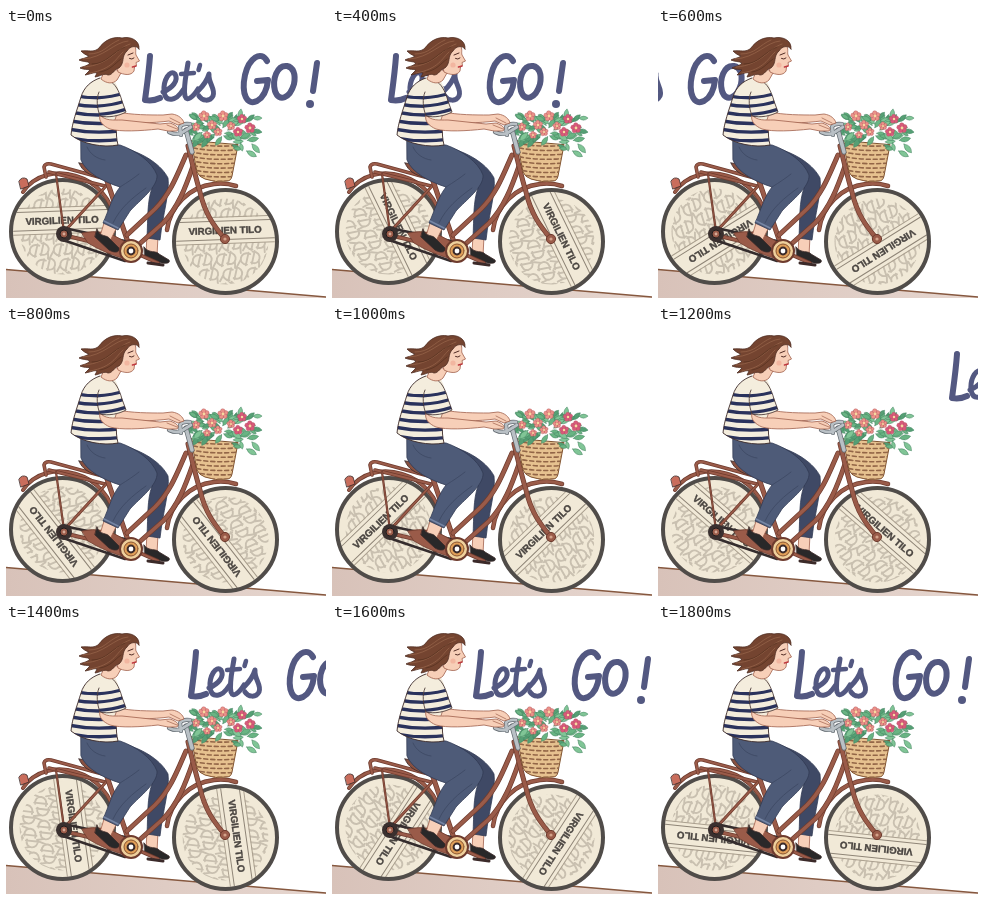
Write an HTML page with a canvas that moves like this. It is 320 px wide and 270 px high and loops after 2000 ms.

```html
<!DOCTYPE html>
<html lang="en">
<head>
<meta charset="utf-8">
<title>Let's Go!</title>
<style>
  html, body { margin: 0; width: 100%; height: 100%; overflow: hidden; background: #fff; }
  canvas { display: block; width: 320px; height: 270px; }
</style>
</head>
<body>
<canvas id="stage" width="320" height="270" role="img" aria-label="Let's Go! A woman rides a bicycle"></canvas>
<script>
const ctx = document.getElementById('stage').getContext('2d');
const LOOP = 2000;
const INK = '#3b2a29', FRAME = '#9a5b49', FRAME_LINE = '#6e3b2e', SKIN = '#f7cfb8', SKIN_LINE = '#a0604c';
const NAVY = '#2a325c', CREAM = '#f1e9d7', DENIM = '#4e5b78', DENIM_FAR = '#3f4965', DENIM_LINE = '#313a54';
const LETTER = '#535881';

// start time, wheel angle in degrees, lettering offset
const poses = [
  [0, -2, 0], [400, 64, -80], [600, 148, -205], [800, 232, -340], [1000, 316, 300],
  [1200, 41, 155], [1400, 82, 46], [1600, 123, 5], [1800, 186, 0]
];

function random(seed) {
  return () => (seed = (seed * 16807) % 2147483647) / 2147483647;
}

function shape(d, fill, stroke = INK, width = 0.8) {
  const path = new Path2D(d);
  if (fill) { ctx.fillStyle = fill; ctx.fill(path); }
  if (stroke) { ctx.strokeStyle = stroke; ctx.lineWidth = width; ctx.stroke(path); }
  return path;
}

function line(d, color, width) { shape(d, null, color, width); }

function tube(d, width = 5, color = FRAME, edge = FRAME_LINE) {
  line(d, edge, width);
  line(d, color, width - 1.4);
}

function disc(x, y, r, fill, stroke, width = 1) {
  ctx.beginPath();
  ctx.arc(x, y, r, 0, Math.PI * 2);
  if (fill) { ctx.fillStyle = fill; ctx.fill(); }
  if (stroke) { ctx.strokeStyle = stroke; ctx.lineWidth = width; ctx.stroke(); }
}

function clipped(path, draw) {
  ctx.save();
  ctx.clip(path);
  draw();
  ctx.restore();
}

function lettering(dx) {
  ctx.save();
  ctx.translate(dx, 0);
  const pen = (d, w = 5) => line(d, LETTER, w);
  pen('M144 28 C143 43 141 57 139 72 C145 73 150 72 154 70', 6);
  pen('M157 64 C166 60 173 53 169 46 C164 41 157 52 158 64 C160 75 170 73 177 62');
  pen('M182 35 C180 48 177 60 179 68 C181 74 187 69 192 61');
  pen('M175 46 L188 45', 4.5);
  pen('M194 37 L192.5 42', 4.5);
  pen('M192 63 C197 58 201 53 203 46 C202 55 210 61 207 68 C204 74 196 73 193 68');
  pen('M261 33 C255 22 243 30 239 47 C235 66 241 78 251 73 C258 69 261 62 262 52 L251 53', 6);
  pen('M281 38 C271 37 266 51 269 63 C273 75 284 70 288 56 C290 46 287 39 281 38 Z', 6);
  pen('M311 35 L307 63', 6);
  disc(304, 76, 4, LETTER);
  ctx.restore();
}

function ground() {
  const fade = ctx.createLinearGradient(0, 0, 320, 0);
  fade.addColorStop(0, '#d8c2b9');
  fade.addColorStop(1, '#e6d6cf');
  shape('M0 241.5 L320 269 V270 H0 Z', fade, null);
  line('M0 241.5 L320 269', '#86583f', 1.3);
}

// one loop-and-stem ornament of the printed wheel cover
function ornament(x, y, flip) {
  ctx.save();
  ctx.translate(x, y);
  ctx.rotate(0.25);
  ctx.scale(flip, 1);
  line('M-3 -7 V6 M-5 -6 C6 -8 6 7 -4 5 M3 1 L5 8', '#c9c0b0', 1.9);
  ctx.restore();
}

function wheel(x, y, degrees) {
  ctx.save();
  ctx.translate(x, y);
  ctx.rotate(degrees * Math.PI / 180);
  disc(0, 0, 52, CREAM);
  const cover = new Path2D();
  cover.arc(0, 0, 43, 0, Math.PI * 2);
  clipped(cover, () => {
    for (let row = -3; row <= 3; row++) {
      for (let col = -4; col <= 4; col++) {
        ornament(col * 12 + (row & 1) * 6, row * 15 + 3, (row + col) & 1 ? 1 : -1);
      }
    }
  });
  ctx.fillStyle = CREAM;
  ctx.fillRect(-46, -24, 92, 26);
  line('M-43 -24.5 H43 M-49 2 H49', '#aba08f', 1);
  line('M-45 -20.5 H45 M-49 -2 H49', '#8f8577', 1);
  ctx.fillStyle = ctx.strokeStyle = '#4a4541';
  ctx.lineWidth = 0.4;
  ctx.font = 'bold 9.7px "Liberation Sans", Arial, sans-serif';
  ctx.textAlign = 'center';
  ctx.textBaseline = 'middle';
  ctx.fillText('VIRGILIEN TILO', 0, -10.5);
  ctx.strokeText('VIRGILIEN TILO', 0, -10.5);
  ctx.restore();
  disc(x, y, 51.5, null, '#504c49', 4);
}

function farLeg() {
  shape('M141 207 L140 225 L151 228 L152 208 Z', SKIN, SKIN_LINE);
  shape('M138 219 C143 226 150 222 153 226 L163 232 C165 236 158 236 152 234 L139 230 Z', '#292829');
  shape('M118 120 C140 126 156 138 162 150 C164 164 157 185 154 212 L141 210 C142 190 141 174 146 160 L126 145 Z',
    DENIM_FAR, DENIM_LINE);
}

function bike() {
  // fenders, rack and lamp
  tube('M17 164 C29 146 51 142 70 148 C91 154 106 172 109 192', 4);
  tube('M161 202 C164 178 183 159 208 156 C216 155 224 156 230 158', 4.5);
  tube('M40 149 L38 139 Q39 135 45 136 L100 151 M43 144 L99 158', 3.6);
  tube('M50 146 L58 204', 2.2);
  shape('M13 153 Q16 148 21 151 L23 158 L15 161 Z', '#c96d5c');

  // stays and main tubes
  tube('M101 157 L57 205', 3);
  tube('M57 207 L125 223', 4);
  tube('M99 147 L125 223', 5.2);
  tube('M180 127 C172 145 165 165 149 181 L121 207', 5);
  tube('M187 138 C180 158 172 180 157 195 L130 219', 5);
  tube('M182 118 C186 134 190 151 194 164 C199 186 208 198 219 211', 5);
  disc(219, 211, 4.6, FRAME, FRAME_LINE);
  disc(219, 211, 1.6, '#d3a28a');

  // saddle
  shape('M73 135 C82 135 93 141 108 145 Q111 149 105 151 L94 150 C83 147 76 143 73 135 Z', '#875040');
}

function drivetrain() {
  line('M58 200 L119 213 M57 212 L119 233', '#342c2d', 2.4);
  shape('M76 205 Q98 200 118 213 L119 231 Q98 225 82 215 Z', FRAME, FRAME_LINE);
  disc(58, 206, 8, '#3a302f');
  disc(58, 206, 4, FRAME, '#201c1d');
  disc(58, 206, 1.4, '#d6aa97');
}

function crank() {
  tube('M125 223 L152 235', 3.6);
  line('M142 235 L157 237', INK, 3);
  disc(125, 223, 11, '#efd09c', FRAME_LINE, 2);
  disc(125, 223, 7, '#df9e58', '#8a5430', 1);
  disc(125, 223, 3.4, '#fff', INK, 2);
}

function nearLeg() {
  shape('M99 192 L94 208 L104 213 L111 199 Z', SKIN, SKIN_LINE);
  shape('M91 201 C94 210 101 206 104 211 L113 220 C114 225 108 225 103 222 L89 209 Z', '#292829');
  shape('M75 111 C88 118 104 117 114 117 C131 123 146 134 151 147 C152 159 134 172 124 183 L112 202 ' +
    'L97 195 C103 182 106 169 114 159 C98 154 80 145 75 132 Z', DENIM, DENIM_LINE);
  line('M114 159 C122 154 128 150 133 146 M81 119 C84 126 91 131 99 132 M107 195 C114 180 126 170 140 160',
    '#3d4863', 0.8);
  line('M98 193 L112 200', '#7686a5', 1.4);
}

function arms() {
  shape('M112 84 C126 87 143 87 157 87 L166 86 C173 87 177 91 178 95 L172 97 L163 93 C148 95 126 96 109 93 Z', SKIN, SKIN_LINE);
  shape('M94 87 C99 93 107 92 116 92 L154 96 L164 95 C170 97 174 100 171 103 L162 103 L152 101 ' +
    'C135 103 114 104 104 101 C97 98 92 93 94 87 Z', SKIN, SKIN_LINE);
  line('M161 97 L171 101 M164 90 L174 95', SKIN_LINE, 0.7);
}

function stripes() {
  for (let i = 0; i < 6; i++) {
    const y = 66 + i * 8.6;
    line(`M60 ${y} Q88 ${y + 7} 126 ${y + 1}`, NAVY, 3.4);
  }
}

function torso() {
  const body = shape('M94 50 C85 53 78 59 75 69 C71 82 66 95 65 107 C76 116 97 120 112 117 ' +
    'C109 105 110 93 116 83 L112 60 L108 51 Z', '#f4eddd', null);
  clipped(body, stripes);
  line('M94 50 C85 53 78 59 75 69 C71 82 66 95 65 107 C76 116 97 120 112 117 C109 105 110 93 116 83', INK, 0.9);
  arms();
  const sleeve = shape('M98 54 C108 55 113 62 116 73 L120 84 C113 88 102 90 94 88 C91 78 89 63 98 54 Z', '#f4eddd', null);
  clipped(sleeve, () => {
    for (let y = 67; y < 92; y += 8.3) line(`M86 ${y + 3} Q104 ${y + 3} 122 ${y - 3}`, NAVY, 3.2);
  });
  line('M116 73 L120 84 C113 88 102 90 94 88 C91 80 90 71 93 64 M116 73 C113 62 109 56 104 53', INK, 0.8);
}

function head() {
  shape('M101 37 L95 51 C101 56 107 56 111 52 L115 45 Z', SKIN, SKIN_LINE);
  shape('M114 17 L128 17 C131 21 129 24 130 27 L133.5 33 L130 34.5 L130.5 37.5 L128.5 39 L128 43 ' +
    'C125 48 118 47 112 44 L109 31 Z', SKIN, SKIN_LINE);
  line('M122 27 L127 25 M123.5 30.5 Q126 32 128 30', '#502b24', 1);
  line('M126.5 39 L130 38', '#bf3940', 1.6);
  disc(121, 37, 2.6, 'rgba(231,126,105,.3)');
  shape('M133 21 C134 12 124 8 116 10 C106 8 98 13 93 20 C88 25 82 22 75 23 C78 26 80 27 83 28 ' +
    'C79 31 76 30 73 32 C77 34 81 33 84 35 C80 39 77 38 74 40 C79 42 81 41 84 42 L79 47 C85 46 88 44 91 45 L89 49 ' +
    'C95 48 98 45 102 47 C107 47 108 41 113 40 C119 35 115 28 121 23 C124 18 130 17 133 21 Z', '#744430', '#4f2c21', 0.8);
  line('M122 13 C108 14 98 30 77 31 M124 16 C109 21 104 37 78 39 M117 24 C110 30 107 41 84 45 M113 12 C101 17 98 26 83 26',
    '#9a684d', 0.7);
  line('M119 19 C106 24 101 36 86 36 M115 31 C108 36 105 42 94 44', '#54301f', 0.7);
}

function handlebar() {
  const bar = 'M163 104 Q171 108 177 104 L185 99 M175 107 L174 99 Q176 95 184 96';
  tube('M180 102 L186 124', 5, '#b9c0c5', '#626970');
  tube(bar, 4.2, '#b9c0c5', '#626970');
}

function basket() {
  const body = shape('M185 113 L191 144 Q193 149 199 151 Q209 155 221 153 Q225 153 226 148 L232 117 Z', '#e6c18f', '#80532e', 1);
  clipped(body, () => {
    for (let row = 0; row < 9; row++) {
      ctx.setLineDash([4, 3]);
      ctx.lineDashOffset = (row & 1) * 3.5;
      const y = 115 + row * 4.4;
      line(`M184 ${y} Q208 ${y + 5} 234 ${y + 2}`, '#936647', 1.6);
    }
    ctx.setLineDash([]);
  });
}

function leaf(x, y, angle, length, color) {
  ctx.save();
  ctx.translate(x, y);
  ctx.rotate(angle);
  const h = length * 0.45;
  shape(`M0 0 Q${length / 2} ${-h} ${length} 0 Q${length / 2} ${h} 0 0 Z`, color, '#458562', 0.5);
  ctx.restore();
}

function flower(x, y, r, color) {
  for (let i = 0; i < 5; i++) {
    const a = i * Math.PI * 0.4 - 0.4;
    disc(x + Math.cos(a) * r * 0.6, y + Math.sin(a) * r * 0.6, r * 0.45, color, '#b3545c', 0.4);
  }
  disc(x, y, r * 0.28, '#f6d9a0');
}

function bouquet() {
  const rnd = random(29);
  const greens = ['#69b483', '#80c596', '#559f74'];
  for (let i = 0; i < 80; i++) {
    const x = 187 + rnd() * 60;
    const y = 90 + rnd() * (x > 226 ? 34 : 21);
    const out = Math.atan2(y - 104, x - 216);
    leaf(x, y, out + (rnd() - 0.5) * 1.8, 7 + rnd() * 5, greens[i % 3]);
  }
  for (const [x, y, r] of [[198, 88, 5], [190, 99, 4], [206, 97, 4.5], [217, 88, 5], [212, 104, 4], [201, 107, 3.5], [225, 98, 4]]) {
    flower(x, y, r, '#eb9289');
  }
  for (const [x, y, r] of [[236, 91, 4.5], [232, 104, 4.5], [244, 100, 5]]) {
    flower(x, y, r, '#d9597c');
  }
}

function draw([, angle, dx]) {
  ctx.fillStyle = '#fff';
  ctx.fillRect(0, 0, 320, 270);
  ctx.lineCap = ctx.lineJoin = 'round';
  lettering(dx);
  ground();
  wheel(56.5, 203.5, angle);
  wheel(219.5, 213.5, angle);
  farLeg();
  bike();
  drivetrain();
  nearLeg();
  crank();
  basket();
  bouquet();
  handlebar();
  torso();
  head();
}

const start = performance.now();
let shown = null;

function tick() {
  const t = (performance.now() - start) % LOOP;
  const pose = poses.findLast(p => p[0] <= t);
  if (pose !== shown) draw(shown = pose);
  requestAnimationFrame(tick);
}
tick();
</script>
</body>
</html>
```
